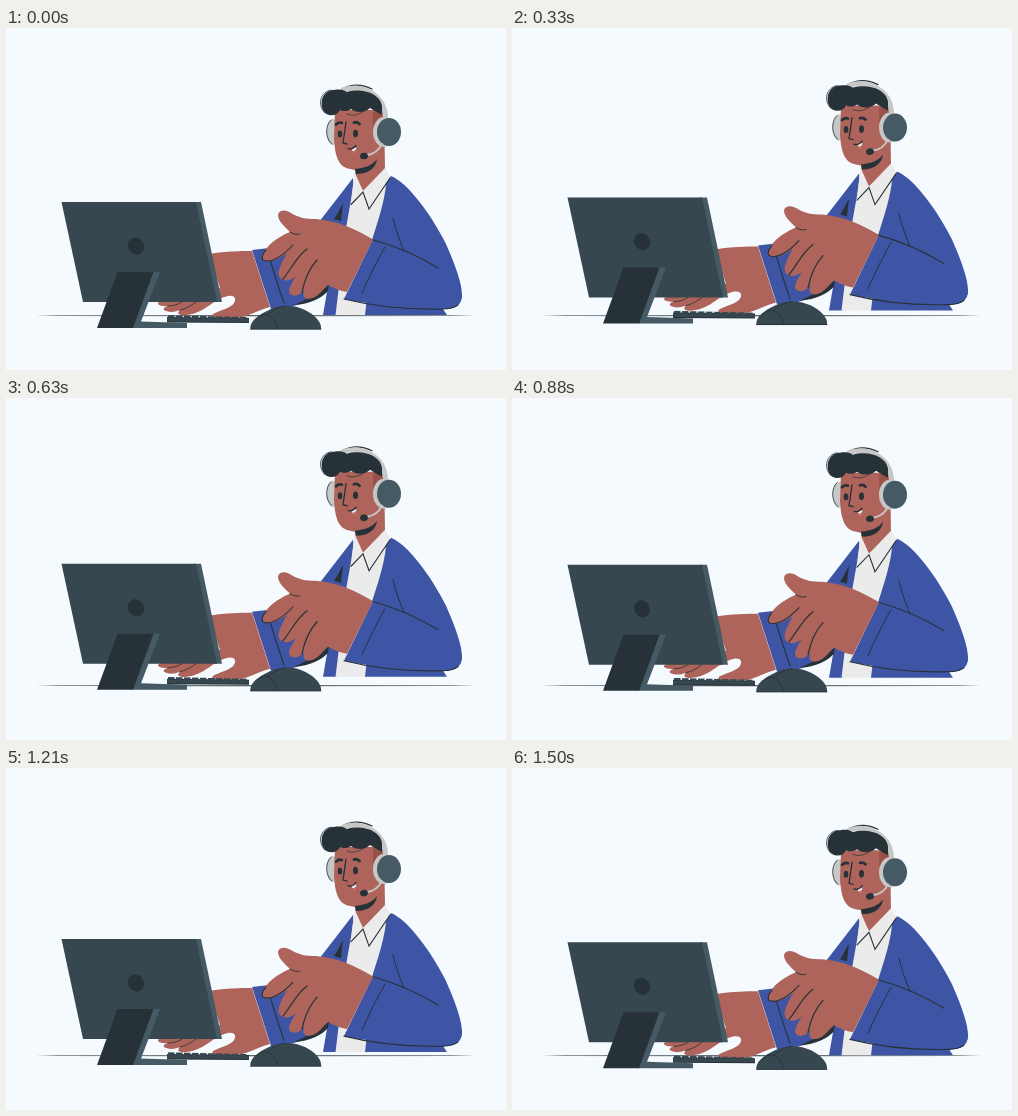
Animation of 500x342 px, one loop 1.54 s. Source, as an HTML page with a canvas:

```html
<!DOCTYPE html>
<html lang="en">
<head>
<meta charset="utf-8">
<title>Call agent</title>
<style>
  html, body { margin: 0; width: 100%; height: 100%; overflow: hidden; background: #f5faff; }
  canvas { display: block; width: 500px; height: 342px; }
</style>
</head>
<body>
<canvas id="stage"></canvas>
<script>
const W = 500, H = 342, LOOP = 1540, STEP = 1000 / 24;
const BG = '#f5faff', DARK = '#263238', SLATE = '#37474f', STEEL = '#455a64';
const BLUE = '#3e55a6', SKIN = '#ae645a', SHADE = '#995247', SHIRT = '#ebebeb', GRAY = '#c7c7c7';

const canvas = document.getElementById('stage');
const ctx = canvas.getContext('2d');
const ratio = window.devicePixelRatio || 1;
canvas.width = W * ratio;
canvas.height = H * ratio;

function fill(color, path) {
  ctx.fillStyle = color;
  ctx.fill(new Path2D(path));
}

function line(path, width = 1, color = DARK) {
  ctx.strokeStyle = color;
  ctx.lineWidth = width;
  ctx.stroke(new Path2D(path));
}

function oval(color, x, y, rx, ry, tilt = 0) {
  ctx.fillStyle = color;
  ctx.beginPath();
  ctx.ellipse(x, y, rx, ry, tilt, 0, Math.PI * 2);
  ctx.fill();
}

function drawTable() {
  fill(DARK, 'M30 287.7 L52 287.4 L250 287.2 L446 287.4 L469 287.7 L446 288 L250 288.2 L52 288Z');
}

function drawBody() {
  fill(BLUE, 'M347 150 L313 194 L322 258 L317 287 L331 287 L350 170Z');
  fill(DARK, 'M337 175 C333 182 331 187 328 191 L335 193Z');
  fill(SHIRT, 'M349 143 L345 172 L340 200 L329.500 287 L361 287 L367 212 L385 150 L378 139Z');
  fill(BLUE, 'M385 148 C402 155 425 186 440 216 C451 241 456 257 456 267 C456 277 449 281 437 281 L441 287 L359 287 L361 270 L366 212 C372 193 379 172 380 156Z');
}

function drawHead() {
  oval(GRAY, 327, 104, 6.5, 13);
  line('M325 92 C319 97 319 111 326 116', .8);
  fill(SKIN, 'M329 82 L328 110 C329 130 333 139 344 141 L349 142 L350 151 L357 163 C366 155 374 149 379 141 L378 82Z');
  fill(SHADE, 'M367 84 C373 82 378 87 377 93 L367 99Z');
  fill(DARK, 'M349 141 C359 140 367 137 371 131 C370 140 362 146 350 146Z');

  oval(DARK, 334, 106, 2.3, 3.5);
  oval(DARK, 349.5, 105.5, 2.5, 3.8);
  ctx.lineCap = 'round';
  line('M330 96.500 Q333 93.500 336 95', 2.6);
  line('M348 94.500 Q351 93.500 353.500 96', 2.8);
  line('M340 94 C339 102 338 108 337 115 L341 116', 1.3);
  oval(SHIRT, 348, 121, 2.4, 1.7, -.5);
  oval('#c96f70', 348.5, 124, 1.6, 1.2, -.5);
  line('M342 120.500 C345 122 348 120 350 117.500', 1.3);

  line('M336 61 C347 55 358 57 366 61', 1.2);
  line('M338 61.500 C357 56 381 67 379.500 94', 5, GRAY);
  fill(DARK, 'M328 62 C336 60.500 339 63 341 64 C353 60 374 64 376 78 L376 87 C371 85 368 82 364 80 C359 85 350 85 345 81 C341 84 336 83 334 82 C331 89 320 89 317 82 C313 71 319 62 328 62Z');
  line('M325 62 C314 64 311 77 319 85', .8);
  line('M341 86 C347 89 354 86 358 83', .7);

  oval(GRAY, 378, 104, 11, 15);
  oval(STEEL, 383, 104, 12, 14);
  line('M376 116 C372 124 367 126 361 127', 2, GRAY);
  oval(DARK, 358, 128, 4, 3.2, -.2);
}

function drawCollar() {
  fill(SHIRT, 'M348.500 144 L345 177 L357 163Z M357 163 L379 140 L384 149 L363 181Z');
  line('M345 176.500 L357 164 L363 181 L384 150', 1.1);
}

function drawFarArm() {
  fill(BLUE, 'M246 222 L263 220 L300 200 L330 210 L323 257 C312 270 291 281 265 281Z');
  fill(DARK, 'M323 256 C315 264 303 270 288 277 C304 276 316 270 322 263Z');
  line('M263 228 C268 245 273 261 278 275', 1.1);
  fill(SKIN, 'M203 226 C220 223 235 223 246 223 L264 279 C250 283 241 289 230 290 L209 290 C205 288 206 286 209 285 C217 281 225 280 228 275 C231 270 228 267 222 268 C212 270 206 276 198 281 C189 286 181 288 175 287 C171 286 172 284 174 282 C167 285 161 284 158 282 C157 280 159 279 162 278 C154 279 150 276 153 274 L214 260Z');
  line('M162 278 C168 278 173 276 176 274 M174 282 C180 281 186 277 190 274', .8);
}

function drawNearArm() {
  fill(BLUE, 'M367 211 C394 218 418 229 436 240 L456 266 C456 278 448 281 437 281 C400 281 367 277 338 271Z');
  line('M366 211.500 C390 218 414 229 432 240', 1.1);
  line('M338 271 C366 278 401 282 437 281 C444 281 449 279 452 277', 1.2);
  line('M379 219 C371 233 363 249 356 265', 1);
  line('M387 190 C390 203 394 213 398 223', 1);

  const hand = 'M272 187 C273 181 281 182 285 185 C293 190 300 191 310 191 C332 193 350 201 367 211.500 L341 264 C335 263 327 260 322 257 C316 262 311 271 302 271 C296 270 297 265 299 261 C294 268 288 269 284 266 C281 262 286 255 290 248 C285 253 278 254 274 250 C270 245 275 236 281 225 C273 231 262 236 257 232 C253 227 264 212 284 204 C278 198 272 193 272 187Z';
  fill(SKIN, hand);
  line('M287 217 C277 228 264 236 257 232 C255 230 257 225 260 222', 1.1);
  line('M301 221 C290 229 284 243 277 251', 1.2);
  line('M311 232 C302 242 298 254 296 264', 1.2);
  line('M284 204 C287 206 291 207 294 206', .9);
}

function drawMonitor() {
  fill(STEEL, 'M188 174 H195 L216 274 H208Z');
  fill(SLATE, 'M55.500 174 H190 L211 274 H77Z');
  oval(DARK, 130, 218, 7.8, 8.8, -.6);
  fill(STEEL, 'M145 244 H154 L135 293.500 L181 295 V300 H126Z');
  fill(DARK, 'M111.500 244 H147.500 L127 300 H91Z');
}

function drawKeyboard() {
  fill(DARK, 'M161 289 L243 290 V295 L161 294.500Z');
  ctx.fillStyle = SLATE;
  for (let i = 0; i < 10; i++) ctx.fillRect(162 + i * 8, 287.3 + i * .18, 6.5, 2.5);
  fill(SLATE, 'M161 290 L243 291 V294 L161 293.500Z');
}

function drawMouse() {
  fill(SLATE, 'M244.500 301.500 C243 294 252 287 263 282 C274 276 289 277 299 282 C309 287 315 294 315 299 V301.500Z');
  line('M250 291 C257 285 262 286 265 289 C269 293 271 296 271 300', .9);
  line('M262 287 C267 282 273 279 280 278', .8);
  line('M244.500 301 H315', .8);
}

// The whole scene floats up and down at a steady speed.
function floatAt(t) {
  const peak = 712, rest = 1480;
  if (t < peak) return -9.4 * t / peak;
  if (t < rest) return -9.4 + 10 * (t - peak) / (rest - peak);
  return .6 - (t - rest) / 75;
}

function draw(t) {
  const step = Math.floor((t + 5) / STEP) % 37;
  ctx.setTransform(ratio, 0, 0, ratio, 0, 0);
  ctx.fillStyle = BG;
  ctx.fillRect(0, 0, W, H);
  drawTable();
  ctx.translate(0, floatAt(step * STEP));
  drawBody();
  drawHead();
  drawCollar();
  drawFarArm();
  drawNearArm();
  drawMonitor();
  drawKeyboard();
  drawMouse();
}

const start = performance.now();
function tick() {
  draw((performance.now() - start) % LOOP);
  requestAnimationFrame(tick);
}
tick();
</script>
</body>
</html>
```
